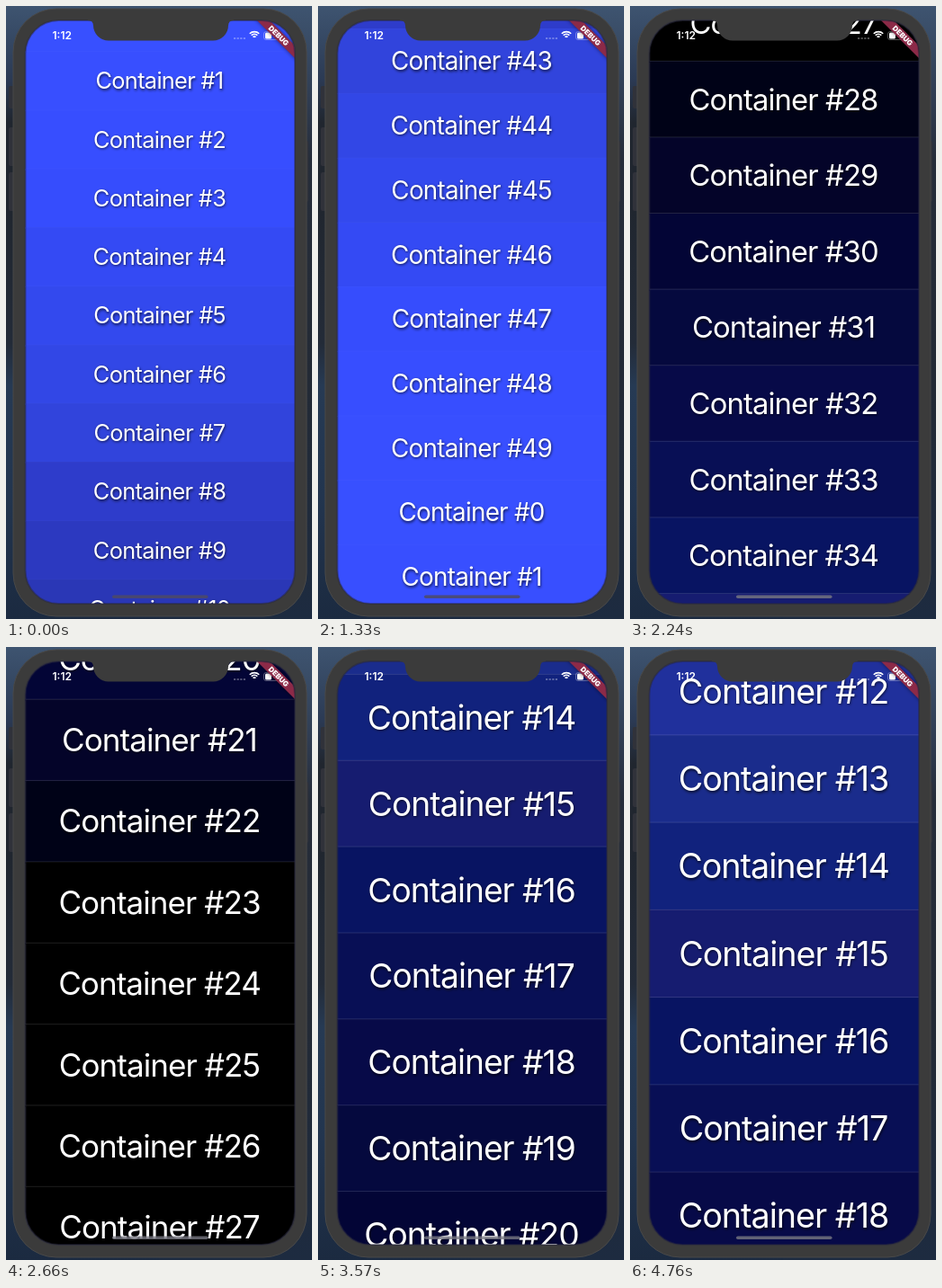
Animation, 340 px wide and 682 px high, one loop 4830 ms. Source, as an HTML page with a canvas:

```html
<!DOCTYPE html>
<html lang="en">
<head>
<meta charset="utf-8">
<title>Infinite container list</title>
<style>
html, body { margin: 0; width: 100%; height: 100%; overflow: hidden; background: #22334e; }
canvas { display: block; }
</style>
</head>
<body>
<canvas id="stage" width="340" height="682"></canvas>
<script>
const ctx = document.getElementById('stage').getContext('2d');
const LOOP = 4830, STEP = 70, COUNT = 50, MIDDLE_X = 170.5, MIDDLE_Y = 341;

// [time in s, list index at mid-screen, indices per second]
const scrollKeys = [
  [0, 4.95, -2.2], [0.77, 1.6, -6.2], [1.33, -3.1, -11.6], [1.89, -12.19, -19.6],
  [2.66, -26.37, -13.4], [3.57, -33.26, -3.5], [4.76, -35, -0.38],
];

// Row colour by distance from index 0, black from 23 on
const shades = ('3850ff 384fff 374eff 364dfd 344af4 3349ee 3247e6 3144dc 2e3ccb 2c39c0 2a37b6 ' +
  '2634ab 20309c 1a2c8c 11227d 161c70 081462 080f55 070a48 05093e 030536 040429 000217 000000').split(' ');

function scrollAt(t) {
  const i = Math.max(1, scrollKeys.findIndex(k => k[0] >= t));
  const [t0, p0, v0] = scrollKeys[i - 1], [t1, p1, v1] = scrollKeys[i];
  const d = t1 - t0, u = (t - t0) / d, w = 1 - u;
  return w * w * ((1 + 2 * u) * p0 + u * d * v0) + u * u * ((3 - 2 * u) * p1 - w * d * v1);
}

function roundRect(x, y, w, h, r, fill) {
  ctx.beginPath();
  ctx.roundRect(x, y, w, h, r);
  if (fill) {
    ctx.fillStyle = fill;
    ctx.fill();
  }
}

function fillGradient(x, w, stops) {
  const gradient = ctx.createLinearGradient(0, 0, 0, 682);
  stops.forEach(stop => gradient.addColorStop(...stop));
  ctx.fillStyle = gradient;
  ctx.fillRect(x, 0, w, 682);
}

function drawDesktop() {
  fillGradient(0, 170, [[0, '#3e5470'], [0.12, '#2b3a54'], [0.19, '#20262f'], [0.33, '#20262f'],
    [0.55, '#232b38'], [0.62, '#263a54'], [0.8, '#22354f'], [1, '#1b2a40']]);
  fillGradient(170, 170, [[0, '#3e5470'], [0.15, '#303d52'], [0.25, '#262d3a'], [0.6, '#232a35'], [1, '#1d2b40']]);
}

function drawPhone() {
  for (const [y, h] of [[89, 25], [135, 43], [185, 43]]) roundRect(3, y, 8, h, 2, '#30323a');
  roundRect(332, 150, 4, 68, 2, '#30323a');
  roundRect(8, 3, 326, 676, 48, '#3b3b3b');
  ctx.strokeStyle = '#494949';
  ctx.lineWidth = 1;
  ctx.stroke();
}

function drawRows(center) {
  const height = 69.25 - 0.8 * center;
  const first = Math.floor(center - MIDDLE_Y / height);
  const last = Math.ceil(center + MIDDLE_Y / height);
  const rows = [];
  for (let n = first; n <= last; n++) {
    const index = ((n % COUNT) + COUNT) % COUNT;
    const depth = Math.min(index, COUNT - index, 23);
    rows.push({ index, depth, y: MIDDLE_Y + (n - center) * height });
  }
  for (const { depth, y } of rows) {
    const top = y - height / 2;
    ctx.fillStyle = '#' + shades[depth];
    ctx.fillRect(20, Math.round(top), 302, Math.ceil(height) + 1);
    ctx.fillStyle = `rgba(255,255,255,${depth > 12 ? 0.12 : 0.02})`;
    ctx.fillRect(20, top - 0.5, 302, 1);
  }
  ctx.save();
  ctx.font = `400 ${height * 0.388}px Inter, sans-serif`;
  ctx.letterSpacing = `${-height * 0.0105}px`;
  ctx.textAlign = 'center';
  ctx.fillStyle = '#fff';
  ctx.shadowColor = 'rgba(0,0,0,.65)';
  ctx.shadowBlur = 3;
  ctx.shadowOffsetX = 0.7;
  ctx.shadowOffsetY = 1.3;
  for (const { index, y } of rows) ctx.fillText('Container #' + index, MIDDLE_X, y + height * 0.141);
  ctx.restore();
}

function drawStatusBar() {
  ctx.fillStyle = '#fff';
  ctx.font = '600 12px Inter, sans-serif';
  ctx.textAlign = 'left';
  ctx.fillText('1:12', 51.5, 37);
  ctx.fillStyle = 'rgba(255,255,255,.3)';
  for (let i = 0; i < 4; i++) ctx.fillRect(253 + i * 3.6, 35, 2.2, 2);

  ctx.strokeStyle = '#fff';
  ctx.lineWidth = 1.6;
  for (const r of [2, 4.7, 7.4]) {
    ctx.beginPath();
    ctx.arc(276, 36, r, -Math.PI * 0.75, -Math.PI * 0.25);
    ctx.stroke();
  }
  ctx.lineWidth = 0.8;
  roundRect(286.5, 28.5, 18, 9, 2.5);
  ctx.strokeStyle = 'rgba(255,255,255,.4)';
  ctx.stroke();
  roundRect(288, 29.5, 7, 7, 1.5, '#fff');
}

function drawBanner() {
  ctx.save();
  ctx.translate(303, 33);
  ctx.rotate(Math.PI / 4);
  ctx.shadowColor = 'rgba(0,0,0,.5)';
  ctx.shadowBlur = 4;
  ctx.fillStyle = '#8c2a48';
  ctx.fillRect(-40, -5, 80, 10);
  ctx.shadowColor = 'transparent';
  ctx.fillStyle = '#fff';
  ctx.font = '900 8px Inter, sans-serif';
  ctx.textAlign = 'center';
  ctx.fillText('DEBUG', 0, 2.9);
  ctx.restore();
}

function drawNotch() {
  ctx.fillStyle = '#3b3b3b';
  ctx.beginPath();
  ctx.moveTo(91, 15);
  ctx.lineTo(91, 16);
  ctx.quadraticCurveTo(97, 16, 97, 22);
  ctx.arcTo(97, 38.5, 114, 38.5, 17);
  ctx.arcTo(247, 38.5, 247, 22, 17);
  ctx.lineTo(247, 22);
  ctx.quadraticCurveTo(247, 16, 253, 16);
  ctx.lineTo(253, 15);
  ctx.fill();
}

function draw(t) {
  const center = scrollAt(t);
  drawDesktop();
  drawPhone();
  ctx.save();
  roundRect(21.5, 16, 299.5, 649, 37);
  ctx.clip();
  drawRows(center);
  drawStatusBar();
  drawBanner();
  roundRect(118, 655.5, 106.5, 3.5, 1.75, center > -8 ? 'rgba(78,74,100,.85)' : 'rgba(120,120,130,.8)');
  ctx.restore();
  // Soft dark rim where the glass meets the bezel
  roundRect(21.5, 16, 299.5, 649, 37);
  ctx.strokeStyle = 'rgba(40,40,62,.5)';
  ctx.lineWidth = 2;
  ctx.stroke();
  drawNotch();
}

function tick() {
  const t = performance.now() % LOOP;
  draw(Math.floor(t / STEP) * STEP / 1000);
  requestAnimationFrame(tick);
}
tick();
</script>
</body>
</html>
```
